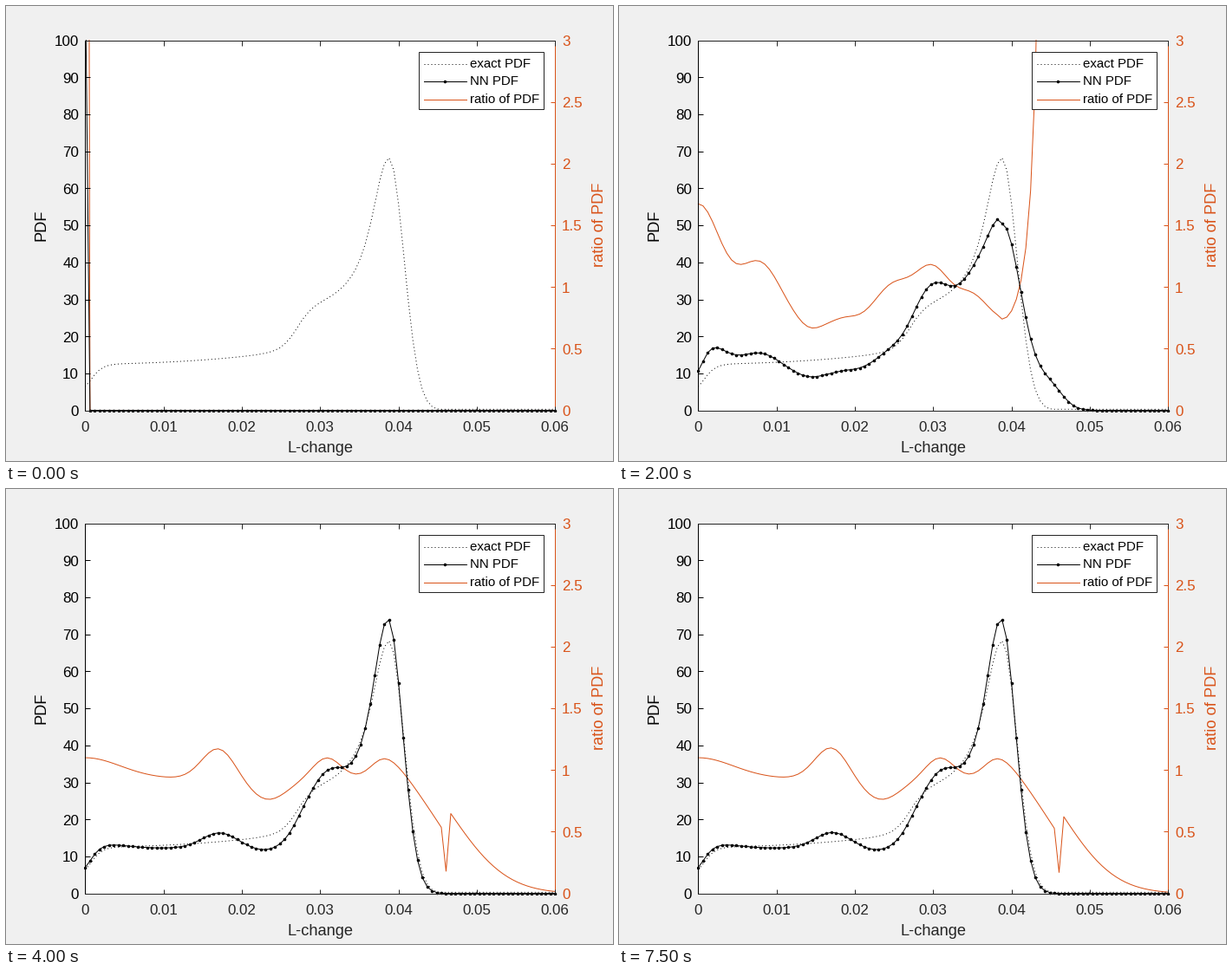
Animation of 700x525 px, one loop 8000 ms. Source, as a matplotlib script:

```python
import matplotlib.pyplot as plt
import numpy as np
from matplotlib.animation import FuncAnimation
from matplotlib.patches import Rectangle

W, H, DPI = 700, 525, 100
FRAMES, STEP = 16, 500
PX = 72 / DPI
DARK, ORANGE = "#262626", "#D95319"
# Just off the pixel centres, so that borders snap to the right pixel.
L, R, T, B = 91.4, 633.4, 39.6, 466.6

x = np.linspace(0, 0.06, 100)
i = np.arange(100.0)
PEAK = 64
past = np.maximum(i - PEAK, 0)


def bell(u, center, width):
    return np.exp(-((u - center) / width) ** 2)


def bumps(u, base, *parts):
    return base + sum(amp * bell(u, c, w) for c, amp, w in parts)


def exact_pdf():
    """Plateau, shoulder and peak, ending in a half Gaussian."""
    u = np.minimum(i, PEAK)
    plateau = 12.4 + 0.0015 * u ** 2 - 6.1 * np.exp(-(u / 2.4) ** 1.4)
    shoulder = 11 / (1 + np.exp((44.6 - u) / 1.6))
    peak = 38.7 / (1 + ((PEAK - u) / 4.35) ** 2.2)
    return (plateau + shoulder + peak) * np.exp(-0.051 * past ** 2)


exact = exact_pdf()


def rough_fit():
    ratio = bumps(i, 0.72, (0, 0.95, 6.8), (13, 0.465, 6), (23.5, -0.07, 3.5),
                  (31, 0.03, 3), (41, 0.285, 5.3), (49.3, 0.43, 5.2),
                  (57.7, 0.205, 4.6))
    tail = 50.5 * np.exp(-0.03 * past ** 2) + 6 * bell(past, 10, 4)
    return np.where(i < PEAK, ratio * exact, tail)


def good_fit_ratio(s):
    """Ratio of the nearly converged fit; s runs from 0 to 1."""
    u = np.minimum(i, 63)
    ratio = bumps(u, 0.93, (0, 0.17, 10.5), (28, 0.24 + 0.015 * s, 4.9),
                  (38.5, -0.17, 5.7), (50.9, 0.17, 4.2), (63, 0.162, 4))
    ratio -= (0.06 + 0.0017 * s) * (np.hypot(i - u, 3.3) - 3.3)
    d = np.maximum(i - 77, 0)
    tail = (0.675 * np.exp(-0.077 * d - 0.0035 * d ** 2)) ** (1 + 0.21 * s)
    ratio = np.where(i < 77, ratio, tail)
    ratio[76] = 0.19 - 0.02 * s
    return ratio


def state(k):
    """Network density and its ratio to the exact one at step k."""
    if k >= 5:
        ratio = good_fit_ratio(1.05 * (1 - np.exp(-(k - 6) / 3)))
        return ratio * exact, ratio
    if k < 3:
        nn = np.where(i == 0, (120, 40, 4.6)[k], 0.0)
    elif k == 3:
        nn = 4 + 30 * bell(x, 0.031, 0.0155)
    else:
        nn = rough_fit()
    return nn, np.minimum(nn / exact, 40)


plt.rcParams["font.family"] = "Liberation Sans"
fig = plt.figure(figsize=(W / DPI, H / DPI), dpi=DPI, facecolor="#f0f0f0")
ax = fig.add_axes([L / W, 1 - B / H, (R - L) / W, (B - T) / H])
ax2 = ax.twinx()
ax.set(xlim=(0, 0.06), ylim=(0, 100), xticks=np.arange(7) / 100,
       yticks=np.arange(0, 101, 10))
ax2.set(ylim=(0, 3), yticks=np.arange(0, 3.1, 0.5))
# The left axes, with the frame and black lines, lie on top.
ax.set_zorder(1)
ax.patch.set_visible(False)
ax2.patch.set_visible(True)

tick = dict(direction="in", length=5.5 * PX, width=PX, labelleft=False,
            labelright=False, labelbottom=False)
ax.tick_params(axis="x", top=True, color=DARK, **tick)
ax.tick_params(axis="y", color="black", **tick)
ax2.tick_params(axis="y", color=ORANGE, **tick)
for a in (ax, ax2):
    for side, sp in a.spines.items():
        sp.set(linewidth=PX, visible=(side == "right") == (a is ax2))
        sp.set_color({"left": "black", "right": ORANGE}.get(side, DARK))


def label(px, py, s, size, color, ha="center", rot=0):
    fig.text(px / W, 1 - py / H, s, fontsize=size * PX, color=color, ha=ha,
             va="baseline", rotation=rot, rotation_mode="anchor")


for n in range(7):
    label(L - 0.4 + n * (R - L) / 6, 491, f"{n / 100:g}", 17, DARK)
    label(641, B + 6.4 - n * (B - T) / 6, f"{n / 2:g}", 17, ORANGE, "left")
for n in range(11):
    label(84, B + 6.4 - n * (B - T) / 10, str(10 * n), 17, "black", "right")
label(363, 515, "L-change", 18.3, DARK)
label(45.5, 252.5, "PDF", 18.3, "black", rot=90)
label(689, 252.5, "ratio of PDF", 18.3, ORANGE, rot=90)

dotted = dict(color="black", lw=PX, ls=(0, (1, 3)), dash_capstyle="butt")
dots = dict(color="black", lw=PX, marker="o", ms=3.6 * PX, mew=0)
solid = dict(color=ORANGE, lw=PX)

ax.plot(x, np.maximum(exact, 0.3), **dotted)
nn_line, = ax.plot(x, x, **dots)
ratio_line, = ax2.plot(x, x, **solid)
# Clip slightly outside the axes so lines on the border keep full weight.
window = Rectangle((90 / W, 1 - 468 / H), 545 / W, 429 / H,
                   transform=fig.transFigure)
for line in (nn_line, ratio_line):
    line.set_clip_path(window)

# Legend, laid out in pixels.
key = fig.add_axes([0, 0, 1, 1], zorder=5)
key.set(xlim=(0, W), ylim=(H, 0))
key.axis("off")
key.add_patch(Rectangle((476.4, 52.6), 144, 66, fc="white", ec=DARK, lw=PX))
for y, name, style in ((66.6, "exact PDF", dotted), (86.6, "NN PDF", dots),
                       (107.6, "ratio of PDF", solid)):
    key.plot([482, 506.4, 531], [y] * 3, markevery=[1], **style)
    key.text(535, y + 4.4, name, fontsize=15 * PX, color="black",
             va="baseline")


def update(k):
    nn, ratio = state(k)
    nn_line.set_ydata(nn)
    ratio_line.set_ydata(ratio)
    return nn_line, ratio_line


anim = FuncAnimation(fig, update, frames=FRAMES, interval=STEP, repeat=True,
                     repeat_delay=0)
plt.show()
```
